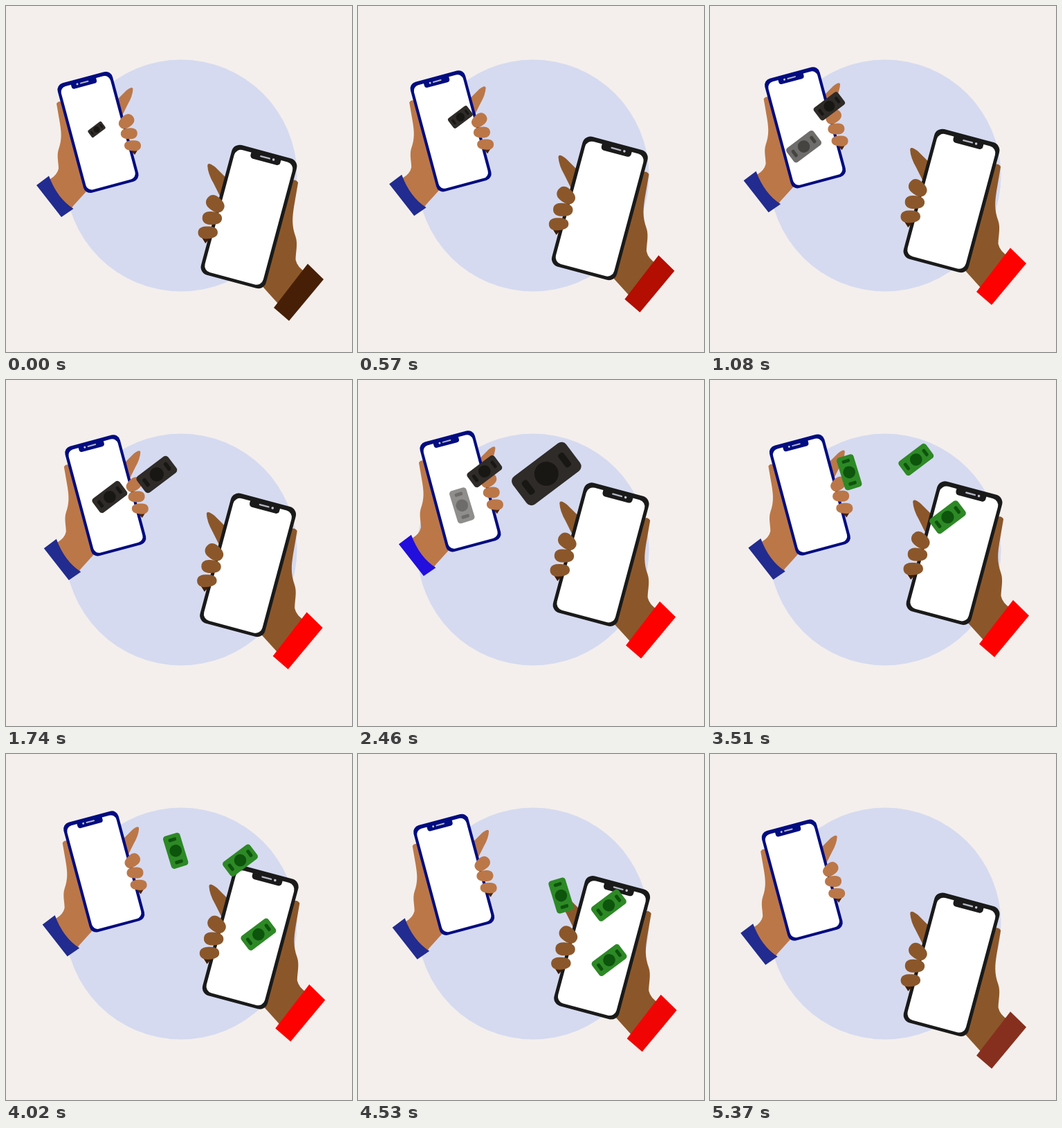
Recreate the animation shown at these times as an HTML page with a canvas. Size 500x500 px, loop 5400 ms.

```html
<!DOCTYPE html>
<html lang="en">
<head>
<meta charset="utf-8">
<title>Money transfer</title>
<style>
html, body { margin: 0; width: 100%; height: 100%; overflow: hidden; background: #f4efec; }
canvas { display: block; width: 100vmin; height: 100vmin; }
</style>
</head>
<body>
<canvas id="stage" width="500" height="500"></canvas>
<script>
const LOOP = 5400;
const ctx = document.getElementById('stage').getContext('2d');

const clamp = u => Math.max(0, Math.min(1, u));
const ramp = (t, from, to) => clamp((t - from) / (to - from));
const mix = (a, b, u) => a + (b - a) * u;
const blend = (a, b, u) => a.map((v, i) => mix(v, b[i], u));
const rgb = c => `rgb(${c.map(Math.round).join(',')})`;

const NAVY = [34, 43, 143], BLUE = [34, 14, 221];
const BROWN = [71, 31, 6], RED = [255, 0, 0], RUST = [131, 48, 31];
const BLACK = [46, 43, 40], BLACK_INK = [24, 23, 20];
const GREEN = [45, 137, 37], GREEN_INK = [13, 84, 13];

// Each bill leaves the left phone, crosses four evenly spaced points and sinks into the right phone.
const STEP = 1020, SINK = [351, 322];
const bills = [
  { start: 0, angle: -37, points: [[131, 178.5], [169, 146], [240, 136], [316, 151], [366, 266]], bulge: 48, fade: 1 },
  { start: 600, angle: -37, points: [[132, 222], [146, 175], [196, 126], [312, 121], [366, 235]], bulge: 0, fade: 700 },
  { start: 2140, angle: 73, points: [[144, 197], [177, 141], [259, 151]], bulge: 0, fade: 600 }
];

function shape(d, color) {
  ctx.fillStyle = color;
  ctx.fill(new Path2D(d));
}

function box(x, y, w, h, r, color) {
  ctx.fillStyle = color;
  ctx.beginPath();
  ctx.roundRect(x, y, w, h, r);
  ctx.fill();
}

function disc(x, y, r, color) {
  ctx.fillStyle = color;
  ctx.beginPath();
  ctx.arc(x, y, r, 0, 7);
  ctx.fill();
}

function phone(color) {
  ctx.save();
  ctx.translate(133, 182.5);
  ctx.rotate(-Math.PI / 12);
  box(-41, -82, 82, 164, 10, color);
  box(-36.8, -76.5, 73.6, 154.5, 8.5, '#fff');
  box(-20, -79, 37.5, 9.5, [0, 0, 4, 4], color);
  disc(-11, -75, 1.5, '#c4c7d4');
  box(-7, -76, 13, 2, 1, '#b4b7c4');
  ctx.restore();
}

function finger(x, y, size, angle, color) {
  ctx.save();
  ctx.translate(x, y);
  ctx.rotate(angle);
  ctx.scale(12, size);
  shape('M-1 0 C-1 -.9 -.3 -1 .2 -1 C.8 -1 1 -.5 1 0 C1 .6 .7 1 .2 1 C-.4 1 -1 .8 -1 0 Z', color);
  ctx.restore();
}

function hand(skin, shade, body) {
  shape('M73 141 Q76 136 81 139 L120 262 L116 268 L97 289 L92 297 L60 253 L64 250 ' +
    'Q74 244 76 235 C76 226 73 216 76 207 C81 193 80 183 78 170 Z', skin);
  shape('M156 140 L174 122 Q183 115 183.5 120 Q183 130 176 142 L167 160 L160 166 Z', skin);
  phone(body);
  shape('M177 205 L191 207 L186 215 Z', shade);
  finger(174, 167, 8.8, -.7, skin);
  finger(177.8, 184.3, 8, -.05, skin);
  finger(183, 201.8, 7.6, .03, skin);
}

function leftHand(t) {
  const peak = 2550;
  const lift = t < peak
    ? Math.sin(Math.PI / 2 * (t / peak) ** 1.15) ** 2
    : 1 - ((t - peak) / (LOOP - peak)) ** 1.3;
  const glow = ramp(t, 1740, 2460) * (1 - ramp(t, 2760, 3480));
  ctx.save();
  ctx.translate(15 * lift, -21.8 * lift);
  hand('#bb7748', '#4b2408', '#000c80');
  shape('M62 245.5 L44 259 L80 305 L97.5 293 Q74 278 62 245.5 Z', rgb(blend(NAVY, BLUE, glow)));
  ctx.restore();
}

function rightHand(t) {
  const s = t / LOOP;
  const sway = -55 * s * (s - .45) * (s - .93);
  const lift = Math.min(t * .0213, (LOOP - 20 - t) * .0291, 60);
  const sleeve = t < LOOP / 2
    ? blend(BROWN, RED, ramp(t, 0, 960))
    : blend(RED, RUST, ramp(t, 4420, LOOP));
  ctx.save();
  ctx.translate(sway, -Math.max(0, lift));
  ctx.save();
  ctx.translate(351, 304.5);
  ctx.scale(-1.185, 1.185);
  ctx.translate(-133, -182.5);
  hand('#8b572a', '#3d1c04', '#1a1a1a');
  ctx.restore();
  shape('M436 372.5 L459 395 L409 455 L387 436 Z', rgb(sleeve));
  ctx.restore();
}

// Smooth curve through the points, u counted in points.
function along(points, u) {
  const at = k => points[Math.max(0, Math.min(points.length - 1, k))];
  const i = Math.floor(u), f = u - i;
  const [a, b, c, d] = [at(i - 1), at(i), at(i + 1), at(i + 2)];
  return b.map((v, k) => v + f / 2 * (c[k] - a[k] +
    f * (2 * a[k] - 5 * v + 4 * c[k] - d[k] + f * (3 * (v - c[k]) + d[k] - a[k]))));
}

function bill(t, { start, angle, points, bulge, fade }) {
  if (t < start) return;
  const leave = 4530;
  const route = [...points.slice(0, -1), points[points.length - 1], SINK];
  const [x, y] = along(route, Math.min((t - start) / STEP, route.length - 1));
  const grow = bulge ? mix(.5, 1, ramp(t, 0, 1400)) : 1;
  const swell = bulge * Math.exp(-(((t - 2500) / 560) ** 2));
  const len = (49 * grow + swell) * (1 - ramp(t, leave, LOOP - 30));
  const ripe = ramp(t, 2460, 3300);
  const paper = rgb(blend(BLACK, GREEN, ripe)), ink = rgb(blend(BLACK_INK, GREEN_INK, ripe));
  const alpha = ramp(t, start, start + fade);
  if (len <= 0) return;
  ctx.save();
  ctx.translate(x, y);
  ctx.rotate(angle * Math.PI / 180);
  ctx.scale(len / 100, len / 100);
  ctx.globalAlpha = alpha;
  box(-50, -26, 100, 52, 9, paper);
  ctx.globalAlpha = alpha * alpha;
  disc(0, 0, 18, ink);
  for (const side of [-1, 1]) box(side * 34 - 5, -12, 10, 24, 4, ink);
  ctx.restore();
}

function draw(t) {
  ctx.fillStyle = '#f4efec';
  ctx.fillRect(0, 0, 500, 500);
  disc(253, 245, 167.5, '#d5daf0');
  leftHand(t);
  rightHand(t);
  for (const b of bills) bill(t, b);
}

const start = performance.now();
function tick() {
  draw((performance.now() - start) % LOOP);
  requestAnimationFrame(tick);
}
tick();
</script>
</body>
</html>
```
